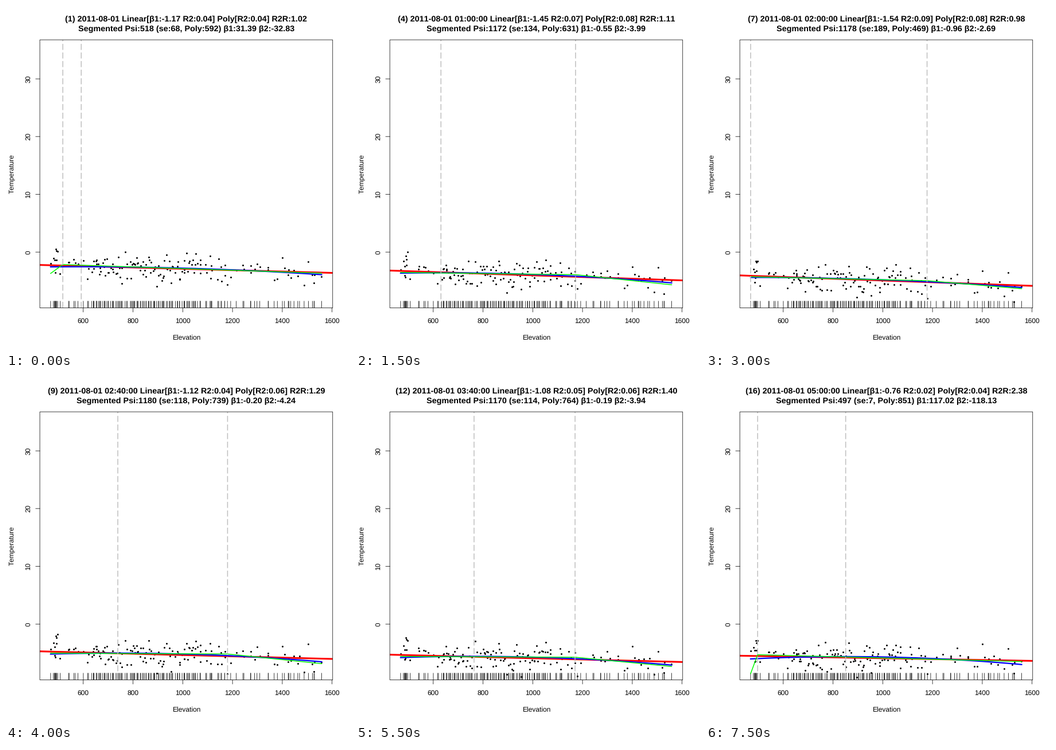
A matplotlib script for the animation above (8000 ms loop, 600x600 px).

```python
import numpy as np
import matplotlib.pyplot as plt
from matplotlib.animation import FuncAnimation

SIZE, FRAMES, STEP = 600, 16, 500
PT = 0.72                                   # points per pixel at 100 dpi
LEFT, RIGHT, TOP, BOTTOM = 59.04, 569.76, 59.04, 526.56
X_SCALE, Y_SCALE = 0.434, 10.07             # pixels per metre / degree
X_600, Y_ZERO = 134.7, 429.2
LOW, HIGH = 425.7, 1602                     # elevations at the plot edges

plt.rcParams.update({"font.family": "Liberation Sans", "text.hinting": "none",
                     "text.kerning_factor": 6})

# Key fits, interpolated in between:
# step, temperature at the left edge, slope per km, R2, poly R2, ratio, poly peak
FITS = np.array([
    (0, -2.23, -1.17, .04, .04, 1.02, 592),
    (3, -3.20, -1.45, .07, .08, 1.11, 631),
    (6, -4.04, -1.54, .09, .08, 0.98, 469),
    (8, -4.72, -1.12, .04, .06, 1.29, 739),
    (11, -5.30, -1.08, .05, .06, 1.40, 764),
    (13, -5.36, -1.18, .06, .07, 1.14, 669),
    (15, -5.48, -0.76, .02, .04, 2.38, 851),
])

# breakpoint, standard error, slope, slope change
SEGMENTS = [
    (518, 68, 31.39, -32.83),
    (1172, 134, -0.55, -3.99),
    (1178, 189, -0.96, -2.69),
    (1180, 118, -0.20, -4.24),
    (1170, 114, -0.19, -3.94),
    (1144, 156, -0.45, -2.83),
    (497, 7, 117.02, -118.13),
]


def make_stations(rng, n=150):
    """Scattered elevations, dense in the middle and sparse high up."""
    share = [0, .02, .05, .12, .23, .35, .49, .73, .82, .87, 1]
    metres = [469, 486, 494, 635, 699, 796, 893, 1075, 1183, 1305, 1558]
    even = np.interp(np.linspace(0, 1, n), share, metres)
    spread = 0.7 * np.gradient(even)
    spread[[0, -1]] = 0
    return np.sort(np.clip(even + rng.normal(0, 1, n) * spread, 469, 1558))


rng = np.random.default_rng(11)
stations = make_stations(rng)
offsets = np.clip(rng.normal(0, 1.35, len(stations)), -3.5, 3.2)
wobble = rng.normal(0, 0.25, (FRAMES, len(stations)))


def sx(elevation):
    return X_600 + (np.asarray(elevation) - 600) * X_SCALE


def sy(temperature):
    return Y_ZERO - np.asarray(temperature) * Y_SCALE


fig = plt.figure(figsize=(SIZE / 100, SIZE / 100), dpi=100, facecolor="white")
ax = fig.add_axes([0, 0, 1, 1])
ax.set(xlim=(0, SIZE), ylim=(SIZE, 0))
ax.axis("off")


def stroke(xs, ys, color="black", width=0.75, **kw):
    return ax.plot(xs, ys, color=color, lw=width * PT, snap=False, **kw)[0]


def label(x, y, text, size=12, **kw):
    return ax.text(x, y, text, fontsize=size * PT, ha="center", va="baseline",
                   rotation_mode="anchor", **kw)


def plot_area(**kw):
    return plt.Rectangle((LEFT, TOP), RIGHT - LEFT, BOTTOM - TOP, **kw)


ax.add_patch(plot_area(fill=False, ec="black", lw=0.75 * PT, snap=False,
                       zorder=9))
for e in range(600, 1601, 200):
    stroke([sx(e)] * 2, [BOTTOM, BOTTOM + 7.2])
    label(sx(e) - 0.2, 552.5, str(e))
for t in range(0, 31, 10):
    stroke([LEFT - 7.2, LEFT], [sy(t)] * 2)
    label(42, sy(t), str(t), rotation=90)
label(314.4, 582, "Elevation")
label(13, 293, "Temperature", rotation=90)

ax.vlines(sx(stations), 514.5, BOTTOM, color="black", lw=0.75 * PT,
          snap=False, zorder=2)

titles = [label(314.4, y, "", 14.4, weight="bold") for y in (27, 44)]
dots = stroke([], [], ls="", marker="o", ms=3 * PT, mew=0, zorder=3)
red = stroke([], [], "#ff0000", 3, zorder=4, solid_capstyle="butt")
blue = stroke([], [], "#0000ff", 2.25, zorder=5)
green = stroke([], [], "#00ff00", 1.5, zorder=6)
marks = [stroke([], [], "#bebebe", 1.5, zorder=7, dashes=(7, 3),
                dash_capstyle="butt") for _ in range(2)]
clip = plot_area(transform=ax.transData)
for line in (dots, red, blue, green, *marks):
    line.set_clip_path(clip)

curve = np.linspace(stations[0], stations[-1], 80)


def draw(i):
    start, slope, r2, poly_r2, ratio, poly = (
        np.interp(i, FITS[:, 0], col) for col in FITS.T[1:])
    psi, se, b1, b2 = SEGMENTS[np.argmin(abs(FITS[:, 0] - i))]

    def linear(e):
        return start + slope / 1000 * (e - LOW)

    # parabola around its peak whose own regression is the straight line
    tilt, base = np.polyfit(stations, (stations - poly) ** 2, 1)
    bend = slope / 1000 / tilt

    def parabola(e):
        return linear(0) + bend * ((e - poly) ** 2 - base)

    # broken line with the same mean as the straight line
    def broken(e):
        return (b1 * (e - psi) + b2 * np.maximum(e - psi, 0)) / 1000

    level = np.mean(linear(stations) - broken(stations))

    dots.set_data(sx(stations), sy(linear(stations) + offsets + wobble[i]))
    red.set_data([LEFT, RIGHT], sy([linear(LOW), linear(HIGH)]))
    blue.set_data(sx(curve), sy(parabola(curve)))
    bends = np.array([stations[0], psi, stations[-1]])
    green.set_data(sx(bends), sy(level + broken(bends)))
    for mark, e in zip(marks, (psi, poly)):
        mark.set_data([sx(e)] * 2, [BOTTOM, TOP])

    hours, minutes = divmod(i * 20, 60)
    clock = f" {hours:02d}:{minutes:02d}:00" if i else ""
    titles[0].set_text(f"({i + 1}) 2011-08-01{clock} Linear[β1:{slope:.2f} "
                       f"R2:{r2:.2f}] Poly[R2:{poly_r2:.2f}] R2R:{ratio:.2f}")
    titles[1].set_text(f"Segmented Psi:{psi} (se:{se}, Poly:{poly:.0f}) "
                       f"β1:{b1:.2f} β2:{b2:.2f}")
    return [dots, red, blue, green, *marks, *titles]


anim = FuncAnimation(fig, draw, frames=FRAMES, interval=STEP, repeat=True,
                     repeat_delay=0, blit=False)
plt.show()
```
